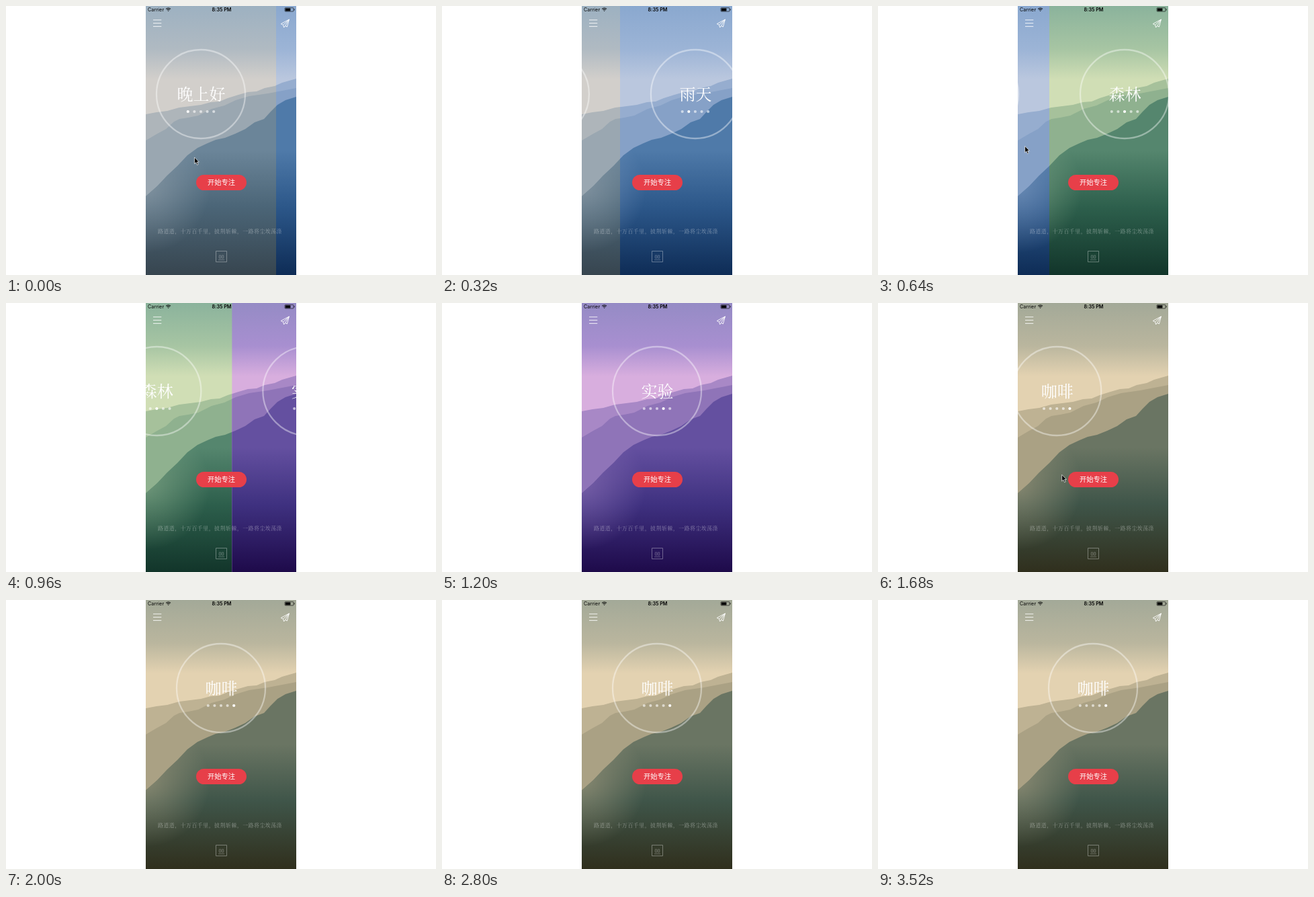
These frames come from a looping animation (640x400 px, 3.6 s). An HTML page:

```html
<!DOCTYPE html>
<html lang="zh">
<head>
<meta charset="utf-8">
<title>专注</title>
<style>
  html, body { margin: 0; width: 100%; height: 100%; overflow: hidden; background: #fff; }
  svg { display: block; width: 640px; height: 400px; }
  text { fill: #fff; font-family: "Noto Sans CJK SC", "Noto Sans CJK", sans-serif; }
  .status { fill: #000; font: 7.2px Inter, Roboto, sans-serif; }
  .title { font-size: 24px; font-weight: 300; text-anchor: middle;
    font-family: "Noto Serif CJK SC", "Noto Sans CJK SC", "Noto Sans CJK", serif; }
  .quote { font-size: 7.9px; font-weight: 300; letter-spacing: .52px; fill-opacity: .42;
    font-family: "Noto Serif CJK SC", "Noto Sans CJK SC", "Noto Sans CJK", serif; }
  .line { fill: none; stroke: #fff; stroke-linejoin: round; }
</style>
</head>
<body>
<svg viewBox="0 0 640 400">
  <defs>
    <clipPath id="screen"><rect x="208" width="224" height="400"/></clipPath>
  </defs>
  <g clip-path="url(#screen)">
    <g id="scenes"></g>
    <g id="cards"></g>

    <text class="status" x="211" y="8" letter-spacing=".1">Carrier</text>
    <g fill="none" stroke="#000" stroke-width="1.1">
      <path d="M238.2 4.4Q241.6 1.5 245 4.4M239.6 5.9Q241.6 4.2 243.6 5.9"/>
      <path d="M240.7 7L241.6 8.1L242.5 7Q241.6 6.3 240.7 7Z" fill="#000" stroke="none"/>
    </g>
    <text class="status" x="321" y="8" text-anchor="middle" font-weight="600" style="font-weight:600">8:35 PM</text>
    <rect x="415" y="2.7" width="13" height="5.4" rx="1" fill="none" stroke="#000" stroke-width=".6"/>
    <rect x="415.8" y="3.4" width="7.6" height="4" rx=".4"/>
    <rect x="428.6" y="4.4" width=".9" height="2" rx=".4"/>

    <path class="line" stroke-opacity=".85" d="M219 20.8H231.3M219 25.6H231.3M219 30.4H231.3"/>
    <path class="line" stroke-width=".9" d="M421.4 20L409.2 26.6L412.6 28.2L413.6 32L415.5 29.6L418.4 31Z M421.4 20L412.6 28.2M421.4 20L415.5 29.6"/>

    <rect x="283" y="251" width="75" height="23" rx="11.5" fill="#e73f49"/>
    <text x="320.5" y="266.3" text-anchor="middle" font-size="10.3">开始专注</text>
    <text class="quote" x="226" y="338">路道道，十万百千里，披荆斩棘，一路将尘埃荡涤</text>
    <g opacity=".42">
      <rect class="line" x="312.5" y="364.5" width="16" height="16" stroke-width=".8"/>
      <text x="320.5" y="375.6" text-anchor="middle" font-size="8" style="font-family:'Liberation Serif',serif">00</text>
      <path class="line" stroke-width=".6" d="M316 377.5H325"/>
    </g>
    <path id="cursor" d="M0 0V9.6L2.2 7.6L3.9 11.3L5.5 10.5L3.9 7H6.8Z" stroke="#fff" stroke-width=".7"/>
  </g>
</svg>
<script>
const LOOP = 3600, STEP = 80, LEFT = 208, WIDTH = 224, MID = 320;

// title, then colours: sky top, sky middle, horizon, far ridge, near ridge, hill top, hill middle, hill foot
const pages = [
  ['晚上好', '#9db1c1', '#b0bac2', '#d2cfcb', '#aeb5ba', '#9aa7b1', '#6b8599', '#4b6577', '#37454f'],
  ['雨天', '#8aa8cf', '#9cb4d6', '#bac7de', '#96adcf', '#86a1c7', '#4f7aa9', '#2c5789', '#0e2c56'],
  ['森林', '#8bb39c', '#a7c5a3', '#d0deb5', '#a6c19b', '#8fb18f', '#55866e', '#2d5f4c', '#12352a'],
  ['雪山', '#958bc5', '#a88fd0', '#d8aede', '#a888c6', '#8f74b8', '#6450a0', '#3f3180', '#1e0a4a'],
  ['咖啡', '#a3a998', '#bab69e', '#e3d2b1', '#beb293', '#aaa184', '#6a7563', '#3f5549', '#302f1d']
];
pages[3][0] = '实验';

const ridges = {
  far: 'M208 161L224 158L240 156L258 151L290 147L305 143L318 142L330 137L346 132L360 128L373 127L385 122L400 119L411 114L432 108V400H208Z',
  near: 'M208 200L225 190L238 183L250 172L258 168L271 166L286 163L296 158L306 153L325 148L342 140L362 134L390 130L432 122V400H208Z',
  hill: 'M208 283L225 268L240 252L255 238L270 222L285 211L300 204L312 199L326 196L341 190L356 183L370 173L384 168L394 157L404 147L416 140L432 135V400H208Z'
};

// scroll position in pages
const scroll = [
  [0, .134], [160, .3], [320, .746], [400, .93], [480, 1], [640, 1.79], [720, 1.96],
  [800, 2], [880, 2], [960, 2.427], [1040, 2.8], [1120, 2.97], [1200, 3], [1280, 3.5],
  [1360, 3.877], [1440, 4], [1680, 4.24], [1760, 4.19], [1840, 4.08], [1920, 4.02], [2000, 4]
];

// pointer drags: start, end, from x, y, to x, y
const drags = [
  [0, 240, 280.5, 225, 210, 222],
  [480, 720, 372, 224, 142, 200.5],
  [1520, 1760, 421, 266, 200, 250]
];

const $ = id => document.getElementById(id);
const mix = (a, b, k) => a + (b - a) * k;

function gradient(id, y1, y2, stops) {
  return `<linearGradient id="${id}" gradientUnits="userSpaceOnUse" x1="0" x2="0" y1="${y1}" y2="${y2}">` +
    stops.map(([at, color]) => `<stop offset="${at}" stop-color="${color}"/>`).join('') + '</linearGradient>';
}

function scene([, top, middle, horizon, far, near, crest, body, foot], i) {
  return `<defs>
      <clipPath id="clip${i}"><rect id="edge${i}" width="${WIDTH}" height="400"/></clipPath>
      ${gradient('sky' + i, 0, 160, [[0, top], [.4, middle], [.68, horizon], [1, horizon]])}
      ${gradient('hill' + i, 135, 400, [[0, crest], [.3, crest], [.62, body], [1, foot]])}
      <radialGradient id="mist${i}" gradientUnits="userSpaceOnUse" cx="208" cy="272" r="95">
        <stop stop-color="${near}" stop-opacity=".6"/><stop offset="1" stop-color="${near}" stop-opacity="0"/>
      </radialGradient>
    </defs>
    <g clip-path="url(#clip${i})">
      <rect x="${LEFT}" width="${WIDTH}" height="400" fill="url(#sky${i})"/>
      <path d="${ridges.far}" fill="${far}"/>
      <path d="${ridges.near}" fill="${near}"/>
      <path d="${ridges.hill}" fill="url(#hill${i})"/>
      <path d="${ridges.hill}" fill="url(#mist${i})"/>
    </g>`;
}

function card([title], i) {
  const dots = pages.map((_, n) =>
    `<circle cx="${MID + (n - 2) * 9.6}" cy="157" r="2.1" fill="#fff" fill-opacity="${n === i ? 1 : .6}"/>`).join('');
  return `<g id="card${i}">
    <circle class="line" cx="${MID}" cy="131" r="66" stroke-width="2.3" stroke-opacity=".4"/>
    <text class="title" x="${MID + .5}" y="140">${title}</text>${dots}</g>`;
}

function position(t) {
  const n = scroll.findIndex(key => key[0] > t);
  if (n < 0) return 4;
  const [t0, p0] = scroll[n - 1], [t1, p1] = scroll[n];
  return mix(p0, p1, (t - t0) / (t1 - t0));
}

function draw(time) {
  const t = Math.floor(time % LOOP / STEP) * STEP;
  const p = position(t);
  pages.forEach((_, i) => {
    const shift = (i - p) * WIDTH;
    $('edge' + i).setAttribute('x', LEFT + Math.max(0, shift));
    $('card' + i).setAttribute('transform', `translate(${shift} 0)`);
  });
  const drag = drags.find(([from, to]) => t >= from && t < to);
  $('cursor').style.display = drag ? '' : 'none';
  if (drag) {
    const [from, to, x0, y0, x1, y1] = drag, k = (t - from) / (to - from);
    $('cursor').setAttribute('transform', `translate(${mix(x0, x1, k)} ${mix(y0, y1, k)})`);
  }
}

$('scenes').innerHTML = pages.map(scene).join('');
$('cards').innerHTML = pages.map(card).join('');

const start = performance.now();
function tick() {
  draw(performance.now() - start);
  requestAnimationFrame(tick);
}
tick();
</script>
</body>
</html>
```
